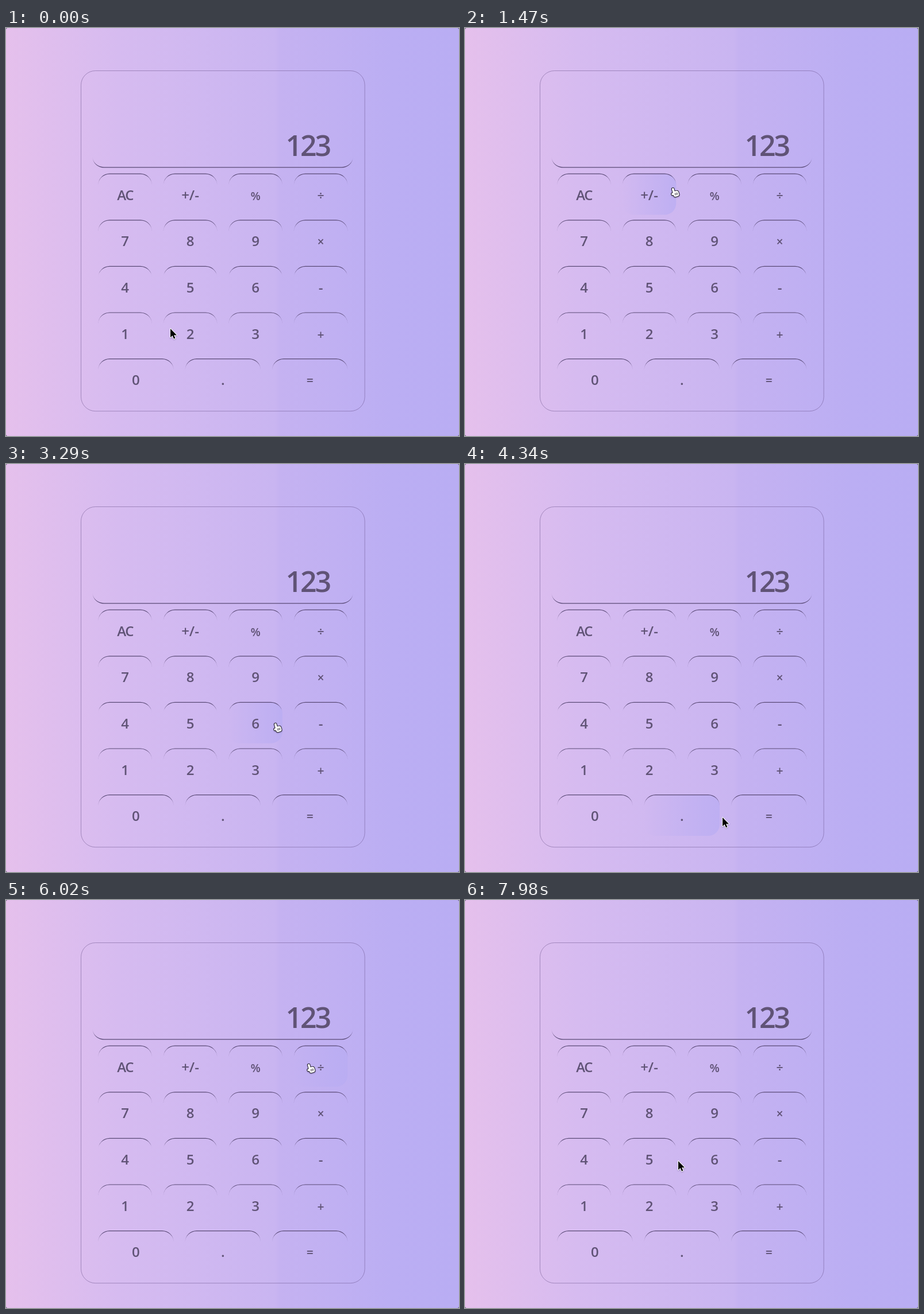
Recreate the animation shown at these times as an HTML page with a canvas. Size 788 by 711 pixels, loop 8000 ms.

```html
<!DOCTYPE html>
<html lang="en">
<head>
<meta charset="utf-8">
<title>Calculator</title>
<style>
html, body { margin: 0; width: 100%; height: 100%; overflow: hidden; background: #c9b5f1; }
canvas { display: block; }
</style>
</head>
<body>
<canvas id="stage" width="788" height="711"></canvas>
<script>
const W = 788, H = 711, LOOP = 8000, STEP = 70;
const ctx = document.getElementById('stage').getContext('2d');
const FONT = '"Open Sans", "Noto Sans", sans-serif';
const INK = '#605376';
const LINE = '#5a4a76';

// Turning points of the pointer: time, x, y
const path = [
  [0, 286, 524], [140, 424, 410], [350, 278, 296], [420, 278, 296],
  [910, 223, 276], [1260, 223, 276], [1470, 361, 279], [2100, 564, 315],
  [2940, 190, 418], [3290, 468, 452], [3780, 562, 531], [4130, 162, 580],
  [4340, 448, 616], [4620, 566, 599], [5180, 186, 286], [6020, 526, 286],
  [6300, 564, 410], [7000, 342, 387], [7350, 201, 430], [7700, 370, 479],
  [7980, 371, 455]
];

// Slope that goes flat at turning points, so the curve never overshoots
function slope(i, axis) {
  const a = path[i - 1], b = path[i], c = path[i + 1];
  if (!a || !c || (b[axis] - a[axis]) * (c[axis] - b[axis]) <= 0) return 0;
  return (c[axis] - a[axis]) / (c[0] - a[0]);
}

function along(t, i, axis) {
  const a = path[i], b = path[i + 1], d = b[0] - a[0], u = (t - a[0]) / d;
  const s = u * u * (3 - 2 * u);
  return a[axis] + (b[axis] - a[axis]) * s +
    d * u * (1 - u) * (slope(i, axis) * (1 - u) - slope(i + 1, axis) * u);
}

function pointerAt(step) {
  const t = Math.min(step * STEP, path.at(-1)[0]);
  let i = 0;
  while (i < path.length - 2 && path[i + 1][0] <= t) i++;
  return { x: along(t, i, 1), y: along(t, i, 2) };
}

const rows = ['AC +/- % ÷', '7 8 9 ×', '4 5 6 -', '1 2 3 +', '0 . ='];
const keys = rows.flatMap((row, r) => {
  const labels = row.split(' ');
  const w = (434 - 20 * (labels.length - 1)) / labels.length;
  return labels.map((label, c) => ({ label, x: 160.3 + c * (w + 20), y: 253.6 + r * 80.6, w, h: 72 }));
});

function keyAt(step) {
  if (step < 1) return null;
  const p = pointerAt(step);
  return keys.find(k => p.x >= k.x && p.x <= k.x + k.w && p.y >= k.y && p.y <= k.y + k.h) || null;
}

function linear(x, w, stops) {
  const g = ctx.createLinearGradient(x, 0, x + w, 0);
  stops.forEach(([at, color]) => g.addColorStop(at, color));
  return g;
}

function box(x, y, w, h, r) {
  ctx.beginPath();
  ctx.roundRect(x, y, w, h, r);
}

// A one-sided border that thins out around its rounded corners
function taper(x, y, w, dir) {
  const r = 20, inner = r - 1.2, top = -dir * Math.PI / 2;
  const base = y + dir * r, ccw = dir < 0;
  ctx.beginPath();
  ctx.ellipse(x + r, base, r, r, 0, Math.PI, top, ccw);
  ctx.ellipse(x + w - r, base, r, r, 0, top, 0, ccw);
  ctx.ellipse(x + w - r, base, r, inner, 0, 0, top, !ccw);
  ctx.ellipse(x + r, base, r, inner, 0, top, -Math.PI, !ccw);
  ctx.fillStyle = LINE;
  ctx.fill();
}

function background() {
  ctx.fillStyle = '#5d5270';
  ctx.fillRect(0, 0, W, H);
  ctx.fillStyle = linear(0, W, [[0, '#e5c0ec'], [.25, '#d6bbf0'], [.594, '#c9b5f1'],
    [.604, '#c5b2f1'], [.85, '#bbaef3'], [1, '#b9adf3']]);
  box(0, 0, W, H, 3);
  ctx.fill();
}

function text(str, x, y, size, spacing, align) {
  ctx.font = `600 ${size}px ${FONT}`;
  ctx.letterSpacing = spacing + 'px';
  ctx.textAlign = align;
  ctx.fillStyle = INK;
  ctx.fillText(str, x, y);
}

function drawKey(k, lit) {
  if (lit) {
    ctx.fillStyle = linear(k.x, k.w, [[0, 'rgba(184,172,243,0)'], [1, 'rgba(184,172,243,.7)']]);
    box(k.x, k.y, k.w, k.h, 20);
    ctx.fill();
  }
  taper(k.x, k.y, k.w, 1);
  const size = k.label === '%' ? 20 : '÷×+='.includes(k.label) ? 21 : 24;
  const spacing = k.label === 'AC' ? -1.5 : 0;
  text(k.label, k.x + k.w / 2, k.y + 46.2, size, spacing, 'center');
}

const arrow = new Path2D('M0 0V15.2L3.5 12L6 17.5L8.4 16.5L6 11.2H11Z');

// Index finger, thumb and palm, outlined together
const hand = new Path2D();
hand.roundRect(-1.6, 0, 3.6, 11, 1.8);
hand.roundRect(-4.6, 8, 5, 4, 2);
hand.roundRect(-1.6, 6.5, 9.6, 9.5, 3);

function drawPointer(p, onKey) {
  const shape = onKey ? hand : arrow;
  ctx.save();
  ctx.translate(p.x, p.y);
  if (onKey) ctx.rotate(-.28);
  ctx.lineJoin = 'round';
  ctx.strokeStyle = onKey ? '#26222e' : '#fff';
  ctx.lineWidth = 2;
  ctx.shadowColor = 'rgba(40,25,70,.3)';
  ctx.shadowBlur = 2;
  ctx.shadowOffsetY = 1;
  ctx.stroke(shape);
  ctx.shadowColor = 'transparent';
  ctx.fillStyle = onKey ? '#fff' : '#000';
  ctx.fill(shape);
  ctx.fillStyle = '#26222e';
  if (onKey) for (let x = 1; x < 7; x += 2) ctx.fillRect(x, 9.5, .8, 4);
  ctx.restore();
}

function draw(now) {
  const step = Math.floor((now % LOOP) / STEP);
  const over = keyAt(step), before = keyAt(step - 1);
  background();
  ctx.strokeStyle = 'rgba(96,72,130,.45)';
  ctx.lineWidth = 1;
  box(130.5, 74.5, 493.6, 593.2, 25);
  ctx.stroke();
  taper(150.3, 243.5, 453.6, -1);
  text('123', 486.5, 223, 50, -3, 'left');
  // Highlights linger one step after the pointer leaves
  keys.forEach(k => drawKey(k, k === over || k === before));
  drawPointer(pointerAt(step), over);
}

let start;
function tick(now) {
  start ??= now;
  draw(now - start);
  requestAnimationFrame(tick);
}
requestAnimationFrame(tick);
</script>
</body>
</html>
```
